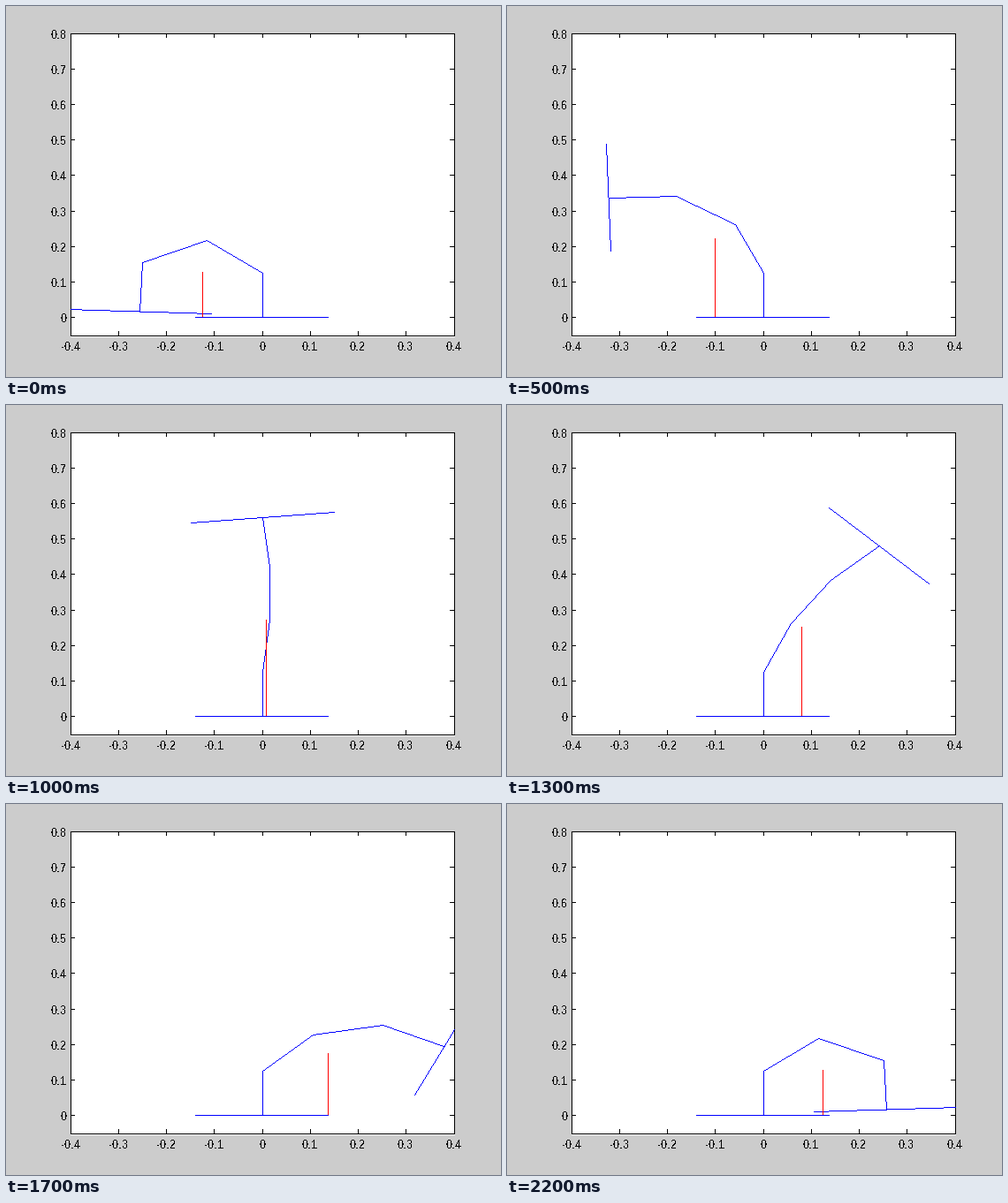
A matplotlib script for the animation above (2300 ms loop, 560 px wide and 420 px high).

```python
import numpy as np
import matplotlib.pyplot as plt
from matplotlib.animation import FuncAnimation
from matplotlib.patches import Rectangle

W, H, DPI = 560, 420, 100
FRAMES, STEP = 23, 0.1
LEFT, RIGHT, TOP, BOTTOM = 73, 507, 32, 374
BLUE, RED = "#0000ff", "#ff0000"

START = np.array([0.9, 1.1, 1.1])      # joint angles, positive leans left
LENGTHS = np.array([0.148, 0.148, 0.14])
MASS_ARMS = np.array([0.098, 0.0515, 0.0185])
SHOULDER, MASS_Y = 0.125, 0.1055
HALF_BAR = 0.15

# Fully hinted glyphs without smoothing
plt.rcParams.update({"text.hinting": "native", "text.hinting_factor": 1,
                     "text.antialiased": False})

fig = plt.figure(figsize=(W / DPI, H / DPI), dpi=DPI, facecolor="#cccccc")
ax = fig.add_axes([0, 0, 1, 1])
ax.set(xlim=(0, W), ylim=(H, 0))
ax.axis("off")


def to_px(x, y):
    x, y = np.asarray(x, float), np.asarray(y, float)
    return np.floor(290.1 + 542.5 * x), np.floor(353.7 - 401.9 * y)


def trace(xs, ys):
    """Pixels of a one-pixel-wide polyline."""
    px, py = [], []
    for x0, x1, y0, y1 in zip(xs, xs[1:], ys, ys[1:]):
        n = int(max(abs(x1 - x0), abs(y1 - y0))) + 1
        px.append(np.floor(np.linspace(x0, x1, n) + 0.5))
        py.append(np.floor(np.linspace(y0, y1, n) + 0.5))
    px, py = np.concatenate(px), np.concatenate(py)
    inside = (px >= LEFT) & (px <= RIGHT) & (py >= TOP) & (py <= BOTTOM)
    return px[inside], py[inside]


def dots(color, z):
    item, = ax.plot([], [], ls="none", marker=",", color=color, zorder=z)
    return item


def line(xs, ys, color="black", z=2):
    dots(color, z).set_data(*trace(xs, ys))


def label(x, y, value, ha):
    ax.text(x, y, f"{value:g}", ha=ha, va="baseline", family="Liberation Sans",
            size=13 * 72 / DPI, color="black")


def draw_axes():
    l, r, t, b = LEFT, RIGHT, TOP, BOTTOM
    ax.add_patch(Rectangle((l, t), r - l + 1, b - t + 1, fc="white", lw=0,
                           antialiased=False, zorder=1))
    line([l, r, r, l, l], [t, t, b, b, t])
    for i in range(-4, 5):
        x = float(to_px(i / 10, 0)[0])
        line([x, x], [b, b - 5])
        line([x, x], [t, t + 4])
        label(x, 390, i / 10, "center")
    for i in range(9):
        y = float(to_px(0, i / 10)[1])
        line([l, l + 4], [y, y])
        line([r, r - 5], [y, y])
        label(69, y + 5, i / 10, "right")


draw_axes()
line(*to_px([-0.14, 0.138], [0, 0]), color=BLUE, z=6)
arm, bar, mass = dots(BLUE, 4), dots(BLUE, 4), dots(RED, 5)


def update(k):
    a = np.cumsum(np.maximum(START - STEP * k, -START))
    s, c = np.sin(a), np.cos(a)

    x = np.concatenate([[0, 0], -np.cumsum(LENGTHS * s)])
    y = np.concatenate([[0, SHOULDER], SHOULDER + np.cumsum(LENGTHS * c)])
    arm.set_data(*trace(*to_px(x, y)))

    ends = np.array([-HALF_BAR, HALF_BAR])
    bar.set_data(*trace(*to_px(x[-1] + ends * c[-1], y[-1] + ends * s[-1])))

    mx, my = -MASS_ARMS @ s, MASS_Y + MASS_ARMS @ c
    mass.set_data(*trace(*to_px([mx, mx], [0, my])))
    return arm, bar, mass


anim = FuncAnimation(fig, update, frames=FRAMES, interval=100, repeat=True,
                     repeat_delay=0, blit=False)
plt.show()
```
